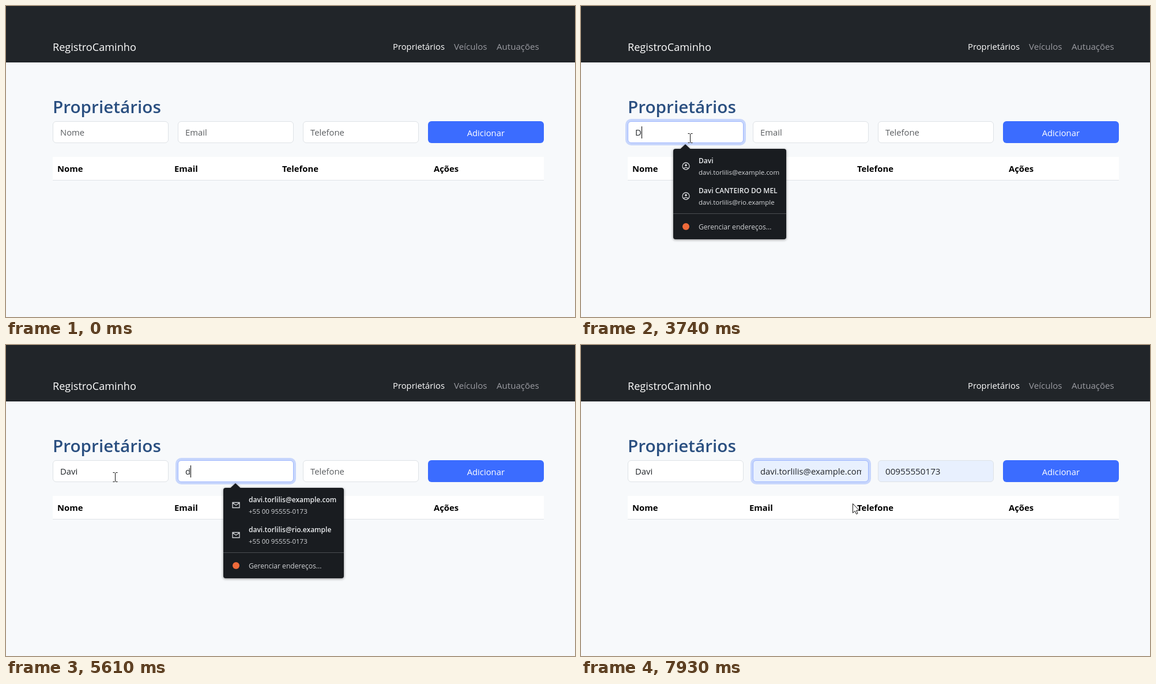
An HTML page that plays this animation: 987 px wide and 540 px high, repeating every 8 s.

```html
<!DOCTYPE html>
<html lang="pt-BR">
<head>
<meta charset="utf-8">
<title>Proprietários</title>
<style>
  html, body { margin: 0; width: 100%; height: 100%; overflow: hidden; background: #f7f9fb; }
  svg { display: block; }
  text { font-family: "Open Sans", "Noto Sans", sans-serif; font-size: 14.8px; white-space: pre; }
  .popup { filter: drop-shadow(0 1px 2px rgba(0, 0, 0, .45)); }
</style>
</head>
<body>
<svg id="stage" width="987" height="540" viewBox="0 0 987 540"></svg>
<script>
const LOOP = 8000;
const NAME = "Davi";
const EMAIL = "davi.torlilis@example.com";
const EMAIL2 = "davi.torlilis@rio.example";
const PHONE = "+55 00 95555-0173";
const PHONE_DIGITS = "00955550173";

const stage = document.getElementById("stage");

function set(node, attrs) {
  for (const k in attrs) node.setAttribute(k, attrs[k]);
  return node;
}
function add(parent, tag, attrs) {
  const node = document.createElementNS("http://www.w3.org/2000/svg", tag);
  parent.appendChild(node);
  return set(node, attrs);
}
function rect(parent, x, y, width, height, fill, rx = 0) {
  return add(parent, "rect", { x, y, width, height, fill, rx });
}
function label(parent, x, y, str, fill, size = 14.8, weight = 400, anchor = "start") {
  const node = add(parent, "text", { x, y, fill, "text-anchor": anchor });
  node.style.fontSize = size + "px";
  node.style.fontWeight = weight;
  node.textContent = str;
  return node;
}
function show(node, on) { node.style.display = on ? "" : "none"; }
const clamp = v => Math.max(0, Math.min(1, v));
const within = (t, spans) => spans.some(([a, b]) => t >= a && t < b);

// Page
rect(stage, 0, 0, 987, 540, "#f7f9fb");
rect(stage, 0, 0, 987, 98, "#212529");
label(stage, 81, 78, "RegistroCaminho", "#fff", 18.1);
label(stage, 671, 76, "Proprietários", "#fff", 14.8);
label(stage, 777, 76, "Veículos", "#9b9ca2", 15.1);
label(stage, 851, 76, "Autuações", "#9b9ca2", 15.1);
label(stage, 81, 186, "Proprietários", "#2a4f80", 29.7, 600);

rect(stage, 81, 262, 852, 40, "#fff");
rect(stage, 81, 302, 852, 1, "#dee2e6");
[[89, "Nome"], [292, "Email"], [479, "Telefone"], [742, "Ações"]]
  .forEach(([x, s]) => label(stage, x, 288, s, "#000", 14.8, 700));

// Form fields
function makeField(x, hint, valueSize = 14.8) {
  const ring = add(stage, "rect", { fill: "#3b6cff" });
  const box = add(stage, "rect", { x: x + .5, y: 200.5, width: 200, height: 37, rx: 5.5 });
  const clip = add(stage, "clipPath", { id: "clip" + x });
  rect(clip, x + 13, 201, 175.5, 36, "#000");
  const group = add(stage, "g", { "clip-path": `url(#clip${x})` });
  const text = label(group, x + 13, 225, hint, "#595c5f");
  const caret = rect(stage, x + 13, 209, 1, 21, "#000");
  return { x, hint, valueSize, ring, box, text, caret };
}
function drawField(f, { value = "", focus = 0, caret = false, filled = false }) {
  const w = 4 * focus;
  set(f.ring, {
    x: f.x - w, y: 200 - w, width: 201 + 2 * w, height: 38 + 2 * w,
    rx: 6 + w, "fill-opacity": .25 * focus
  });
  set(f.box, {
    fill: filled ? "#e8f0fe" : "#fff",
    stroke: focus > .5 ? "#9db6ff" : focus > 0 ? "#b9cbf6" : "#dee2e6"
  });
  const str = value || f.hint;
  if (f.text.textContent !== str) f.text.textContent = str;
  f.text.style.fontSize = (value ? f.valueSize : 14.8) + "px";
  set(f.text, { fill: value ? "#212529" : "#595c5f" });
  show(f.caret, caret);
  if (caret) {
    const len = value ? f.text.getComputedTextLength() : 0;
    set(f.caret, { x: f.x + 13 + Math.round(len) });
  }
}
const nameField = makeField(81, "Nome");
const emailField = makeField(298, "Email");
const phoneField = makeField(515, "Telefone", 15.2);
rect(stage, 732, 200, 201, 38, "#3b6cff", 6);
label(stage, 832.3, 226, "Adicionar", "#fff", 14.8, 400, "middle");

// Autofill popups
function personIcon(parent, x, y) {
  const g = add(parent, "g", { transform: `translate(${x} ${y})`, stroke: "#d3d5d8", "stroke-width": 1.3, fill: "none" });
  add(g, "circle", { r: 6 });
  add(g, "circle", { cy: -1.6, r: 1.9, fill: "#d3d5d8", stroke: "none" });
  add(g, "path", { d: "M-4 4.2Q0 .6 4 4.2" });
}
function mailIcon(parent, x, y) {
  add(parent, "path", {
    transform: `translate(${x} ${y})`, fill: "none", stroke: "#d3d5d8", "stroke-width": 1.3,
    d: "M-6 -4.5H6V4.5H-6ZM-6 -4L0 .2L6 -4"
  });
}
function makePopup(x, width, icon, rows) {
  const g = add(stage, "g", { class: "popup" });
  rect(g, x, 248, width, 157, "#191c20", 4);
  add(g, "path", { d: `M${x + 12} 248.5L${x + 21} 240L${x + 30} 248.5Z`, fill: "#191c20" });
  const hover = rect(g, x + 4, 252, width - 8, 52, "#2e3135", 6);
  rows.forEach(([title, sub], i) => {
    const y = 272.5 + 52 * i;
    icon(g, x + 22, y + 5.5);
    label(g, x + 44, y, title, "#eceef0", 12, 600);
    label(g, x + 44, y + 20.5, sub, "#d6d8db", 11.5);
  });
  rect(g, x, 360, width, 1, "#4b4e52");
  add(g, "circle", { cx: x + 22, cy: 383, r: 6, fill: "#ee6a3a" });
  label(g, x + 44, 388, "Gerenciar endereços...", "#d0d2d5", 12.1);
  return { g, hover, cx: x + width / 2 };
}
function drawPopup(p, alpha, hovered) {
  show(p.g, alpha > 0);
  show(p.hover, hovered);
  const s = 1 - .05 * (1 - alpha);
  set(p.g, {
    opacity: alpha,
    transform: `translate(${p.cx} 326.5) scale(${s}) translate(${-p.cx} -326.5)`
  });
}
const namePopup = makePopup(160, 196, personIcon, [[NAME, EMAIL], ["Davi CANTEIRO DO MEL", EMAIL2]]);
const emailPopup = makePopup(377, 209, mailIcon, [[EMAIL, PHONE], [EMAIL2, PHONE]]);

// Visible from start, fading in two steps before end
function popupAlpha(t, start, end) {
  if (t < start || t >= end) return 0;
  return t < end - 140 ? 1 : t < end - 70 ? .84 : .36;
}

// Mouse
const mouse = add(stage, "g", {});
const disc = add(mouse, "circle", { r: 12, cx: -2, cy: -1, fill: "#ff0", "fill-opacity": .5 });
const arrow = add(mouse, "path", {
  d: "M.5 .5V16.6L4.2 13.2L6.6 18.6L9 17.5L6.7 12.2H11.6Z",
  fill: "#fff", stroke: "#111", "stroke-width": 1, "stroke-linejoin": "round"
});
const beam = add(mouse, "path", {
  d: "M-3.5 -7.5H-.5M1.5 -7.5H4.5M-3.5 8.5H-.5M1.5 8.5H4.5M.5 -7V8",
  stroke: "#111", fill: "none"
});
const PATH = [
  [520, 917, 527], [590, 897, 514], [660, 868, 488], [730, 838, 456], [870, 803, 416],
  [940, 789, 409], [1080, 730, 425], [1290, 643, 427], [1430, 537, 427], [1570, 460, 402],
  [1710, 395, 363], [1920, 262, 276], [2060, 196, 232], [2130, 186, 227], [2940, 186, 227],
  [3080, 189, 229], [6730, 189, 229], [6940, 240, 250], [7150, 360, 267], [7360, 420, 273],
  [7500, 428, 274], [7650, 428, 274], [7930, 471, 274.5], [8000, 478, 274.5]
];
function mouseAt(t) {
  const i = Math.max(1, PATH.findIndex(p => p[0] >= t));
  const [t0, x0, y0] = PATH[i - 1], [t1, x1, y1] = PATH[i];
  const k = clamp((t - t0) / (t1 - t0));
  return [Math.round(x0 + (x1 - x0) * k), Math.round(y0 + (y1 - y0) * k)];
}
function drawMouse(t) {
  show(mouse, t >= 520);
  const [x, y] = mouseAt(t);
  const overField = y > 200 && y < 238 && x > 81 && x < 282;
  set(mouse, { transform: `translate(${x} ${y})` });
  show(beam, overField);
  show(arrow, !overField);
  show(disc, within(t, [[2130, 2280], [7500, 7650]]));
}

const STARTS = [0, 520, 1360, 2210, 3010, 4590, 6800, 7650];
function stepTime(t) {
  const s = STARTS.filter(v => v <= t).pop();
  return s + Math.floor((t - s) / 70) * 70;
}
function typed(now, str, times) {
  return str.slice(0, times.filter(v => v <= now).length);
}

function draw(now) {
  const t = stepTime(now);
  const filled = t >= 7150;
  const leave = clamp((t - 4560) / 100);
  drawField(nameField, {
    value: typed(now, NAME, [3740, 3940, 4200, 4330]),
    focus: clamp((t - 2180) / 100) * (1 - leave),
    caret: within(now, [[2210, 2680], [3280, 4590]])
  });
  drawField(emailField, {
    value: filled ? EMAIL : typed(now, EMAIL, [5610, 5810]),
    focus: leave,
    caret: within(now, [[4590, 5150], [5610, 6340], [6800, 7150]]),
    filled
  });
  drawField(phoneField, { value: filled ? PHONE_DIGITS : "", filled });
  drawPopup(namePopup, popupAlpha(now, 2210, 4800), false);
  drawPopup(emailPopup, popupAlpha(now, 5610, 7790), filled);
  drawMouse(t);
}

const begin = performance.now();
function frame() {
  draw((performance.now() - begin) % LOOP);
  requestAnimationFrame(frame);
}
frame();
</script>
</body>
</html>
```
